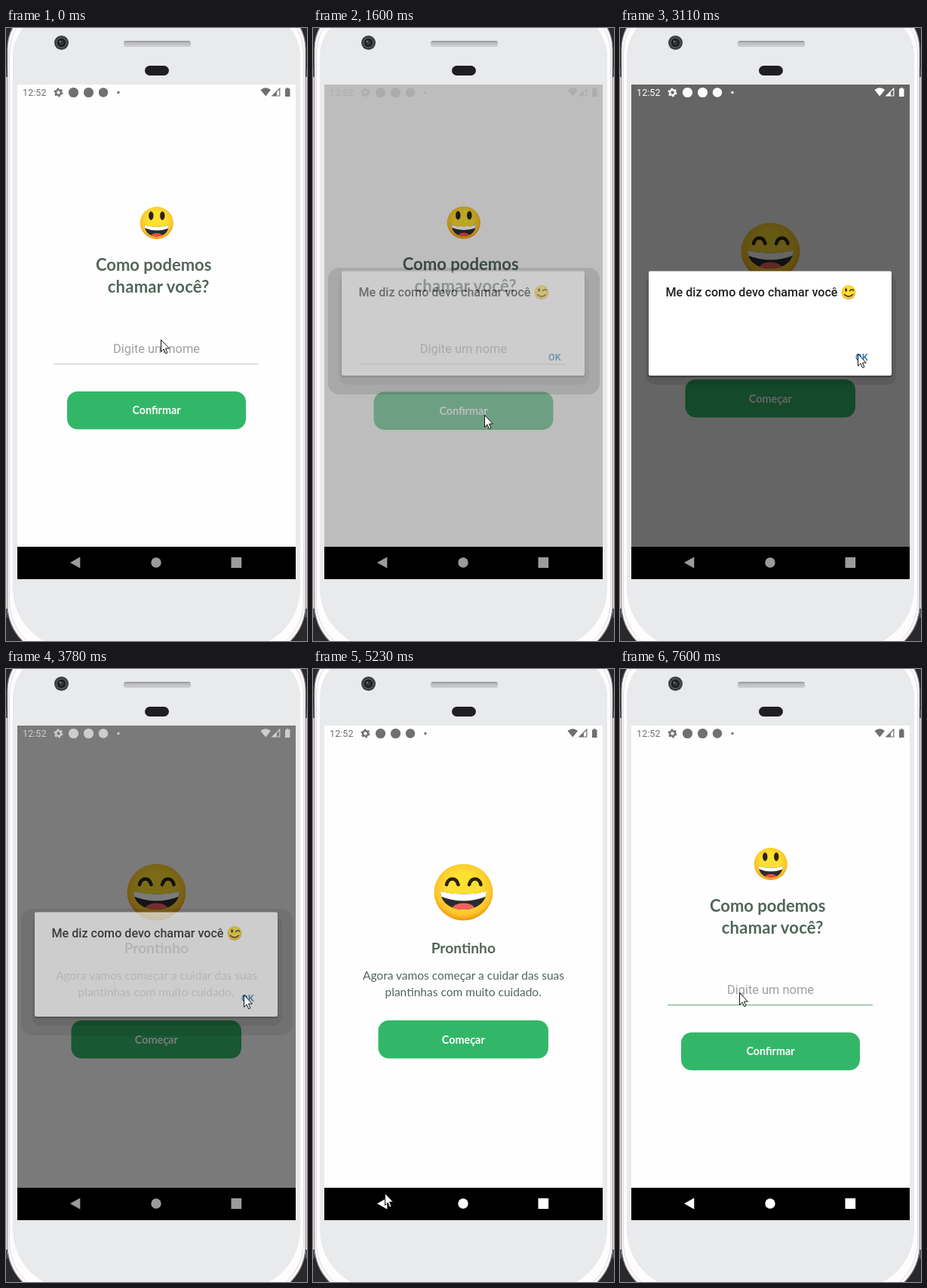
An HTML page for the animation above (8 s loop, 399 by 813 pixels).

```html
<!DOCTYPE html>
<html lang="pt">
<head>
<meta charset="utf-8">
<title>Boas-vindas</title>
<style>
  html, body { margin: 0; width: 100%; height: 100%; overflow: hidden; background: #29292c; }
  svg { display: block; width: 399px; height: 813px; }
  text { text-anchor: middle; }
  .geo { font-family: Lato, "Open Sans", sans-serif; }
  .ui { font-family: Roboto, Arial, sans-serif; }
  .bold { font-weight: 700; }
  .head { fill: #52665a; }
</style>
</head>
<body>
<svg viewBox="0 0 399 813" xmlns="http://www.w3.org/2000/svg">
  <defs>
    <clipPath id="screenClip"><rect x="15" y="75" width="369" height="613"/></clipPath>
    <clipPath id="navClip"><rect x="15" y="688" width="369" height="43"/></clipPath>
    <clipPath id="smallMouth"><path d="M183.5 261.5Q199.8 266 216 261.5C215.500 271.500 208 276.500 199.800 276.500S184 271.500 183.500 261.500Z"/></clipPath>
    <clipPath id="bigMouth"><path d="M169 295Q199.500 302 230 295C229.500 311 215 319 199.500 319S169.500 311 169 295Z"/></clipPath>
    <radialGradient id="skin" cx=".5" cy=".42" r=".6">
      <stop offset=".45" stop-color="#fde030"/>
      <stop offset=".8" stop-color="#fbc52b"/>
      <stop offset="1" stop-color="#f08a08"/>
    </radialGradient>
    <linearGradient id="slot" x2="0" y2="1">
      <stop offset="0" stop-color="#8f8f91"/>
      <stop offset=".35" stop-color="#bcbdbf"/>
      <stop offset="1" stop-color="#cfd0d2"/>
    </linearGradient>
  </defs>

  <!-- phone body -->
  <rect width="399" height="813" fill="#29292c"/>
  <path fill="#d8d4d6" d="M0 56H399V776H0Z"/>
  <path fill="#fefcfd" stroke="#a39c9f" stroke-width="1.2" d="M2 28A60 60 0 0 1 62-32H337A60 60 0 0 1 397 28V764A70 70 0 0 1 327 834H72A70 70 0 0 1 2 764Z"/>
  <path fill="none" stroke="#dedadc" d="M4.500 32A60 60 0 0 1 64.500-28H334.500A60 60 0 0 1 394.500 32V760A72 72 0 0 1 322.500 832H76.500A72 72 0 0 1 4.500 760Z"/>
  <path fill="#e8eaec" d="M9 38A60 60 0 0 1 69-22H330A60 60 0 0 1 390 38V743A80 80 0 0 1 310 823H89A80 80 0 0 1 9 743Z"/>
  <path fill="#55555a" d="M0 54h2v11H0zM397 54h2v11h-2zM0 770h2v12H0zM397 770h2v12h-2z"/>
  <circle cx="73.500" cy="19.500" r="9.500" fill="#3d3e40"/>
  <circle cx="73.500" cy="19.500" r="6.300" fill="#1d1e20" stroke="#68696b"/>
  <circle cx="73.500" cy="19.500" r="3" fill="#34373b"/>
  <circle cx="71.800" cy="17.800" r="1.100" fill="#8a8d91"/>
  <rect x="156" y="17" width="89" height="8" rx="3" fill="url(#slot)"/>
  <rect x="184" y="50" width="32" height="13" rx="6.500" fill="#1f1f23"/>

  <g clip-path="url(#screenClip)">
    <rect x="15" y="75" width="369" height="613" fill="#fefefe"/>

    <!-- name form -->
    <g id="form">
      <ellipse cx="199.800" cy="258.500" rx="22" ry="21.500" fill="url(#skin)"/>
      <ellipse cx="192.300" cy="249" rx="3.200" ry="5.700" fill="#2b2118"/>
      <ellipse cx="207.300" cy="249" rx="3.200" ry="5.700" fill="#2b2118"/>
      <g clip-path="url(#smallMouth)">
        <rect x="183" y="260" width="34" height="18" fill="#2a2b2f"/>
        <path d="M183 260H217V265Q200 272 183 265Z" fill="#fff"/>
        <ellipse cx="199.800" cy="276.500" rx="8" ry="4.500" fill="#ef4b45"/>
      </g>
      <g class="geo bold head" font-size="22">
        <text x="195.700" y="321.500">Como podemos</text>
        <text x="202.200" y="350.500" letter-spacing=".25">chamar você?</text>
      </g>
      <text class="ui" x="199.500" y="430.700" font-size="16.400" fill="#a0a0a0">Digite um nome</text>
      <rect id="line" x="63" y="445" width="272" height="1.200"/>
      <rect id="caret" x="199" y="413" width="1.600" height="23" fill="#32b768"/>
      <g id="confirm">
        <rect x="81" y="482" width="237" height="50.300" rx="14" fill="#32b768"/>
        <text class="geo bold" x="199.500" y="512.300" font-size="14.300" fill="#fff">Confirmar</text>
      </g>
    </g>

    <!-- done page -->
    <g id="done">
      <rect x="15" y="75" width="369" height="613" fill="#fefefe"/>
      <ellipse cx="199.500" cy="296" rx="39" ry="37.500" fill="url(#skin)"/>
      <path d="M177 286C179 276 190 276 192.500 286M207 286C209.500 276 220.500 276 222.500 286" fill="none" stroke="#2b2118" stroke-width="4.600" stroke-linecap="round"/>
      <g clip-path="url(#bigMouth)">
        <rect x="168" y="293" width="63" height="27" fill="#2a2b2f"/>
        <path d="M168 293H231V301Q199.500 314 168 301Z" fill="#fff"/>
        <ellipse cx="199.500" cy="318" rx="15" ry="7.500" fill="#f0625c"/>
      </g>
      <text class="geo bold head" x="199.300" y="376.700" font-size="19.200">Prontinho</text>
      <g class="geo head" font-size="15.500">
        <text x="199.500" y="411.800">Agora vamos começar a cuidar das suas</text>
        <text x="199.200" y="433.800">plantinhas com muito cuidado.</text>
      </g>
      <rect x="86.500" y="466" width="225.500" height="50.500" rx="14" fill="#32b768"/>
      <text class="geo bold" x="199.300" y="496.800" font-size="14.400" fill="#fff">Começar</text>
    </g>

    <rect id="dim" x="15" y="75" width="369" height="613"/>

    <!-- alert -->
    <rect id="halo" x="20" y="318" width="360" height="168" rx="15"/>
    <g id="alert">
      <rect x="34" y="328" width="332" height="145" rx="12" opacity=".1"/>
      <rect x="37.500" y="324" width="323" height="139.500" rx="3" opacity=".25"/>
      <rect x="38" y="322.500" width="322" height="138.500" rx="2" fill="#fff"/>
      <g class="ui" font-weight="500">
        <text x="174.500" y="356" font-size="16.100" fill="#212121">Me diz como devo chamar você</text>
        <text x="320.500" y="440.500" font-size="12.500" letter-spacing=".3" fill="#1a75bb">OK</text>
      </g>
      <circle cx="303" cy="350.500" r="9.500" fill="url(#skin)"/>
      <ellipse cx="299.600" cy="347.500" rx="1.400" ry="2.300" fill="#2b2118"/>
      <path d="M304.500 348.500Q307 345.500 309.500 348M297.500 353.500Q303 358.500 308.500 353.500" fill="none" stroke="#2b2118" stroke-width="1.500" stroke-linecap="round"/>
    </g>

    <!-- status bar -->
    <g id="status">
      <text class="ui" x="37.800" y="90.200" font-size="12.600">12:52</text>
      <circle cx="69.500" cy="85.500" r="3.400" fill="none" stroke="currentColor" stroke-width="2.400"/>
      <circle cx="69.500" cy="85.500" r="5" fill="none" stroke="currentColor" stroke-width="2" stroke-dasharray="2.618"/>
      <circle cx="89.500" cy="85.500" r="6.600"/>
      <circle cx="109.500" cy="85.500" r="6.600"/>
      <circle cx="129" cy="85.500" r="6.200"/>
      <circle cx="149" cy="85.500" r="1.700"/>
      <path d="M337.500 82Q344.200 76.700 351 82L344.200 90.500Z"/>
      <path d="M353 90H362.800V80.300ZM358.200 90V85" fill="none" stroke="currentColor" stroke-width="1.200"/>
      <path d="M353 90H358.500V84.500Z"/>
      <path d="M370 80.500H371.800V79.300H374.700V80.500H376.500V91H370Z"/>
    </g>
  </g>

  <!-- navigation bar -->
  <g clip-path="url(#navClip)">
    <rect x="15" y="688" width="369" height="43"/>
    <ellipse id="ripple" cx="92" cy="709.500" rx="17" ry="22" fill="#fff"/>
    <g id="nav">
      <path d="M85 709L98.300 701.500V716.500Z"/>
      <circle cx="199" cy="709" r="6.700"/>
      <rect x="298.500" y="702" width="13.700" height="14"/>
    </g>
  </g>

  <path id="cursor" d="M.5.5V16.300L4.100 12.900L6.700 18.700L9 17.700L6.500 12H11.400Z" fill="#fff" stroke="#111" stroke-width="1"/>
</svg>
<script>
const LOOP = 8000;
const el = {};
document.querySelectorAll('svg [id]').forEach(n => el[n.id] = n);

// Bursts of screen updates: first, last, count
const bursts = [
  [0, 0, 1], [440, 560, 2], [990, 1350, 4], [1600, 2080, 5], [2220, 2220, 1],
  [2360, 2720, 4], [2870, 3110, 3], [3780, 3780, 1], [3930, 4170, 3],
  [4470, 4840, 4], [5110, 5230, 2], [5370, 5500, 2], [5650, 5650, 1],
  [5800, 5920, 2], [6070, 6070, 1], [6220, 6580, 4], [6740, 6860, 2],
  [7110, 7230, 2], [7600, 7600, 1]
];
const ticks = bursts.flatMap(([a, b, n]) =>
  Array.from({ length: n }, (_, i) => n > 1 ? a + (b - a) * i / (n - 1) : a));

// Pointer path: time, x, y
const path = [
  [0, 205, 413], [320, 205, 413], [560, 209, 422], [870, 209, 422],
  [1230, 227, 513], [2080, 227, 513], [2220, 248, 504], [2720, 299, 446],
  [2750, 299, 446], [3110, 315, 432], [3780, 315, 432], [4170, 34, 394],
  [4350, 34, 394], [4840, 89, 695], [5110, 95, 695], [5230, 95, 695],
  [5500, 141, 586], [5650, 98, 732], [5920, 88, 714], [6070, 88, 713],
  [6220, 82, 705], [6340, 60, 650], [6460, 46, 590], [6580, 64, 520],
  [6860, 158, 429], [LOOP, 158, 429]
];

const ramp = (t, a, b) => Math.min(1, Math.max(0, (t - a) / (b - a)));
const smooth = u => u * u * (3 - 2 * u);
const easeOut = u => 1 - (1 - u) ** 2;
const mix = (a, b, u) => a + (b - a) * u;

function pointer(t) {
  const i = Math.max(1, path.findIndex(p => p[0] >= t));
  const [a, b] = [path[i - 1], path[i]];
  const u = ramp(t, a[0], b[0]);
  return [mix(a[1], b[1], u), mix(a[2], b[2], u)];
}

function zoom(node, s) {
  node.setAttribute('transform', `translate(199.5 376) scale(${s}) translate(-199.5 -376)`);
}

const fade = (node, a) => node.setAttribute('opacity', a);

function draw(now) {
  const t = ticks.filter(k => k <= now).pop();

  const push = smooth(ramp(t, 1550, 1910));
  const back = easeOut(ramp(t, 6190, 6720));
  zoom(el.form, t < 6000 ? 1 + 0.075 * push : 1);
  zoom(el.done, mix(0.925, 1, push) - 0.075 * back);
  fade(el.done, ramp(t, 1720, 2020) * (1 - back));
  fade(el.confirm, 1 - 0.8 * (ramp(t, 1150, 1300) - ramp(t, 1540, 1690)));

  const shown = ramp(t, 1540, 1680) * (1 - ramp(t, 3710, 3910));
  fade(el.alert, shown);
  fade(el.halo, shown > 0 ? (1 - shown) * 0.2 : 0);
  fade(el.dim, 0.6 * (ramp(t, 1540, 1680) - smooth(ramp(t, 3710, 4010))));
  const g = Math.round(mix(112, 255, shown));
  el.status.setAttribute('fill', `rgb(${g},${g},${g})`);
  el.status.setAttribute('color', `rgb(${g},${g},${g})`);

  el.nav.setAttribute('fill', t < 5110 ? '#9b9b9b' : '#fff');
  fade(el.ripple, t < 6070 ? 0 : 0.22 * (1 - ramp(t, 6070, 6460)));

  const focus = t >= 7110;
  el.line.setAttribute('fill', focus ? '#76b58c' : '#cfcfcf');
  fade(el.caret, focus && t < 7600 ? 1 : 0);

  const [x, y] = pointer(t);
  el.cursor.setAttribute('transform', `translate(${x} ${y})`);
}

const start = performance.now();
function loop() {
  draw((performance.now() - start) % LOOP);
  requestAnimationFrame(loop);
}
loop();
</script>
</body>
</html>
```
